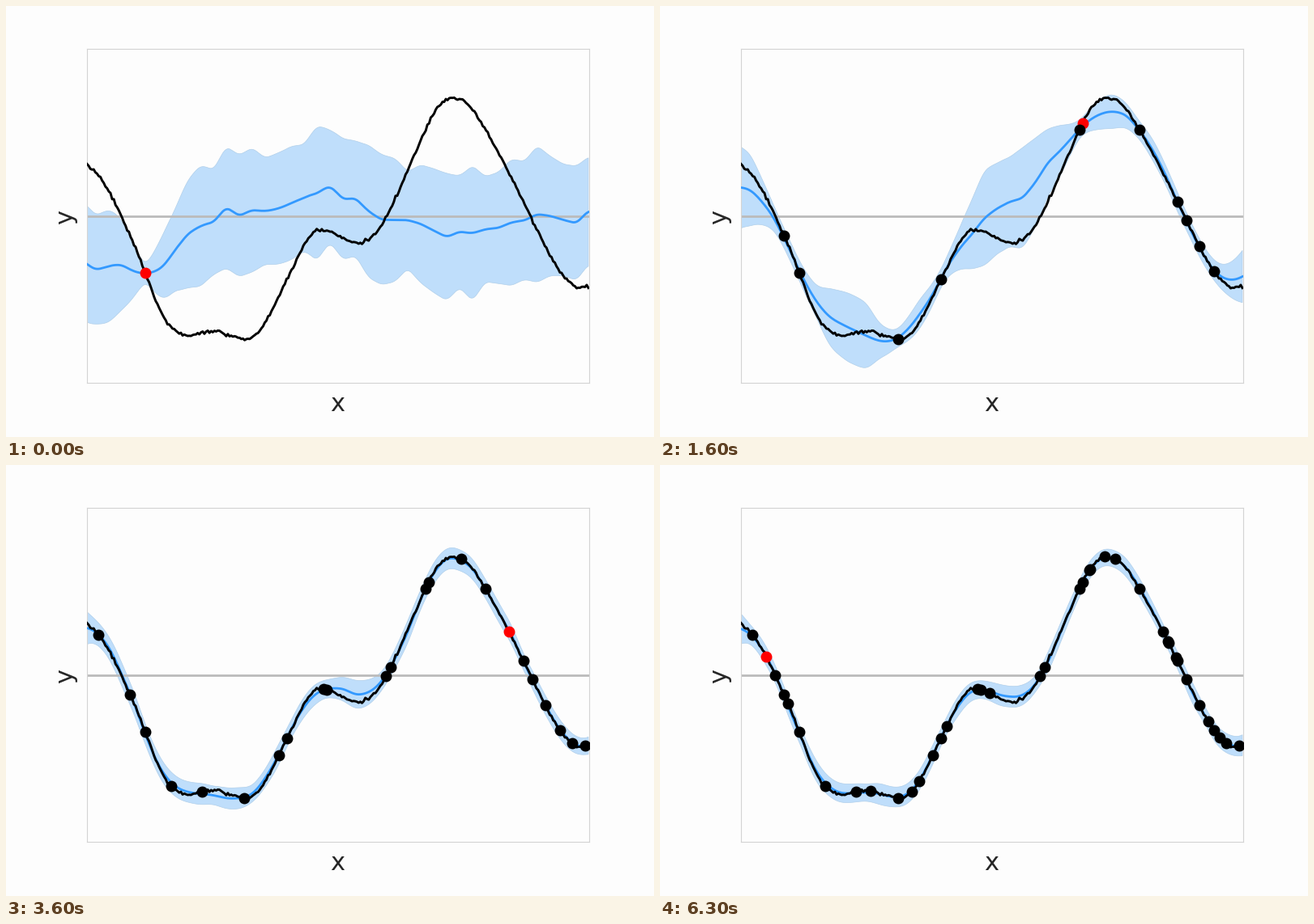
Recreate the animation shown at these times as a matplotlib script. Size 800 by 533 pixels, loop 6400 ms.

```python
import numpy as np
import matplotlib.pyplot as plt
from matplotlib.animation import FuncAnimation

W, H, DPI = 800, 533, 100
LEFT, RIGHT, TOP, BOTTOM = 100, 720, 53.3, 466.4
MIDDLE = (TOP + BOTTOM) / 2
FRAMES, INTERVAL, STEP = 64, 100, 166

SPREAD = 72       # half width of the band without observations
NOISE = 8         # trust in a single observation
MIN_WIDTH = 10    # the band never gets narrower than this
WOBBLE = 0.08     # unevenness of the band, relative to its width

X = np.linspace(LEFT, 719, 300)

# Key points of the sampled function, in stage pixels
KNOTS = np.array([
    (100, 196), (121, 219), (142, 259.5), (172, 330), (192, 380), (204, 397),
    (222, 407), (250, 402.5), (272, 406), (294, 412), (311, 403.5), (337, 358.5),
    (354, 323), (374, 286), (390, 277), (416, 287), (436, 293), (455, 282),
    (475, 250), (518, 153), (536, 122), (552, 113), (574, 126), (592, 153),
    (639, 242), (684, 328), (699, 344), (719, 347)])

# Where the function is observed, in order of arrival
DOT_X = np.array([172, 518, 294, 592, 639, 347, 684, 153, 650, 666, 522,
                  204, 699, 114, 337, 242, 562, 469, 392, 715, 475, 396, 621,
                  158, 530, 311, 677, 407, 142, 637, 320, 531, 354,
                  549, 627, 260, 691, 628, 131])

# Bumps of the first guess (centre, height, width); they fade with more data
BUMPS = [(100, 45, 35), (395, -36, 45), (555, 25, 60)]


def spline(x, knots):
    """Natural cubic spline."""
    kx, ky = knots.T
    h, n = np.diff(kx), len(kx)
    a, rhs = np.eye(n), np.zeros(n)
    for j in range(1, n - 1):
        a[j, j - 1:j + 2] = h[j - 1], 2 * (h[j - 1] + h[j]), h[j]
        rhs[j] = 6 * ((ky[j + 1] - ky[j]) / h[j] - (ky[j] - ky[j - 1]) / h[j - 1])
    m = np.linalg.solve(a, rhs)
    i = np.clip(np.searchsorted(kx, x) - 1, 0, n - 2)
    u, v = kx[i + 1] - x, x - kx[i]
    return ((m[i] * u**3 + m[i + 1] * v**3) / (6 * h[i])
            + (ky[i] / h[i] - m[i] * h[i] / 6) * u
            + (ky[i + 1] / h[i] - m[i + 1] * h[i] / 6) * v)


DOT_Y = spline(DOT_X, KNOTS)


def first_guess(x, step):
    bumps = sum(a * np.exp(-((x - c) / w) ** 2) for c, a, w in BUMPS)
    return MIDDLE + bumps * np.exp(-step / 4)


def wobble(rng):
    """Smooth random unevenness along the x axis."""
    knots = np.arange(LEFT - 20, RIGHT + 40, 16)
    rough = np.interp(X, knots, rng.normal(size=len(knots)))
    return np.convolve(np.pad(rough, 2, mode="edge"), np.ones(5) / 5, "valid")


def belief(step):
    """Gaussian process fitted to the observations: upper edge, mean, lower edge."""
    xs, ys = DOT_X[:step + 1], DOT_Y[:step + 1]
    reach = min(40 + 1.5 * step, 52)

    def kernel(a, b):
        return SPREAD**2 * np.exp(-0.5 * ((a[:, None] - b) / reach) ** 2)

    cross = kernel(X, xs)
    gain = np.linalg.solve(kernel(xs, xs) + NOISE**2 * np.eye(len(xs)), cross.T).T
    mean = first_guess(X, step) + gain @ (ys - first_guess(xs, step))
    var = np.maximum(SPREAD**2 - (gain * cross).sum(axis=1), 0)
    half = np.sqrt(var + MIN_WIDTH**2)

    rng = np.random.default_rng(step)
    mean = mean + WOBBLE * half * wobble(rng)
    half = half * (1 + WOBBLE * wobble(rng))
    return mean - half, mean, mean + half


fig = plt.figure(figsize=(W / DPI, H / DPI), dpi=DPI, facecolor="#fdfdfd")
ax = fig.add_axes([LEFT / W, 1 - BOTTOM / H, (RIGHT - LEFT) / W, (BOTTOM - TOP) / H],
                  facecolor="#fdfdfd")
ax.set(xlim=(LEFT, RIGHT), ylim=(BOTTOM, TOP), xticks=[], yticks=[])
for spine in ax.spines.values():
    spine.set(color="#d3d3d3", linewidth=0.8)

label = dict(fontsize=22, family="DejaVu Sans", color="#262626",
             ha="center", va="baseline", rotation_mode="anchor")
fig.text(409.3 / W, 1 - 501 / H, "x", **label)
fig.text(82 / W, 1 - 261 / H, "y", rotation=90, **label)

band, = ax.fill([LEFT, RIGHT, RIGHT], [260, 260, 261], facecolor="#bfdefb",
                edgecolor="#b0cfea", linewidth=0.5, zorder=1)
ax.axhline(MIDDLE, color="#bbbbbb", linewidth=2, zorder=2)
mean_line, = ax.plot([], [], color="#3399ff", linewidth=2, zorder=3)
jitter = np.random.default_rng(4).normal(0, 1, len(X))
ax.plot(X, spline(X, KNOTS) + jitter, color="black", linewidth=2.1, zorder=4)
dot = dict(marker="o", linestyle="", markersize=10, markeredgewidth=0)
newest, = ax.plot([], [], color="red", zorder=5, **dot)
seen, = ax.plot([], [], color="black", zorder=6, **dot)


def draw(i):
    step = ((i + 1) * INTERVAL - 1) // STEP
    top, mean, low = belief(step)
    band.set_xy(np.column_stack([np.r_[X, X[::-1]], np.r_[top, low[::-1]]]))
    mean_line.set_data(X, mean)
    newest.set_data(DOT_X[step:step + 1], DOT_Y[step:step + 1])
    seen.set_data(DOT_X[:step], DOT_Y[:step])
    return band, mean_line, newest, seen


anim = FuncAnimation(fig, draw, frames=FRAMES, interval=INTERVAL,
                     repeat=True, repeat_delay=0, blit=False)
plt.show()
```
